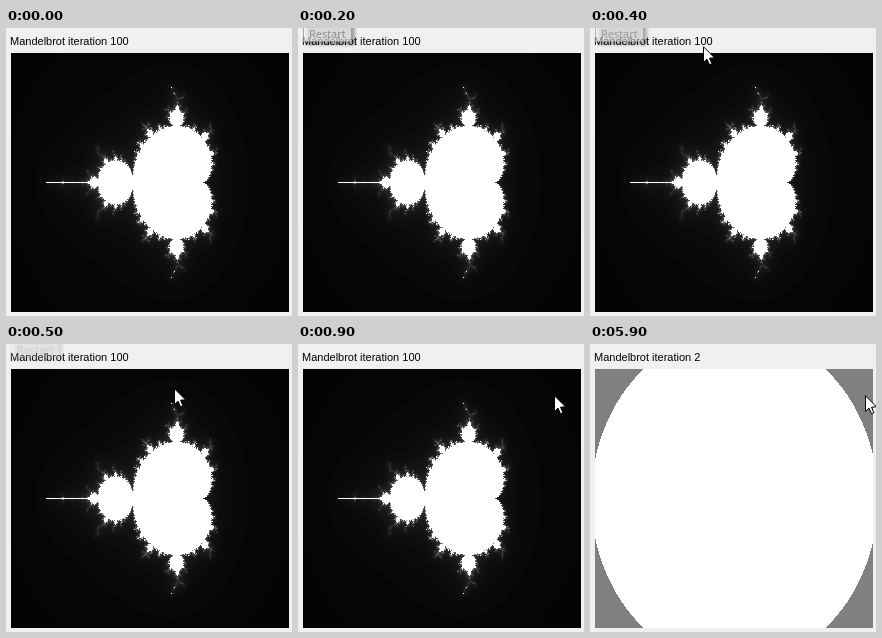
These frames come from a looping animation (286x288 px, 8 s). An HTML page with a canvas:

```html
<!DOCTYPE html>
<html lang="en">
<head>
<meta charset="utf-8">
<title>Mandelbrot iteration</title>
<style>
html, body { margin: 0; width: 100%; height: 100%; overflow: hidden; background: #f0f0f0; }
canvas { display: block; }
</style>
</head>
<body>
<canvas id="stage" width="286" height="288"></canvas>
<script>
const ctx = document.getElementById('stage').getContext('2d');
const LOOP = 8000, STEP = 100, RESTART = 5900;
const PLOT = { x: 5, y: 25, w: 278, h: 259 };

// Pointer tip by time: [ms, x, y]
const PATH = [
  [300, 62, -2], [400, 113, 18], [500, 168, 44], [600, 212, 53],
  [700, 249, 55], [800, 253, 53], [900, 256, 51], [1000, 266, 51], [1100, 275, 51]
];
const TIP_ALPHA = [0, 0.2, 0.6, 0.93, 0.5, 0.14, 0];

// Number of iterates that stay within radius 4
function countSteps(cx, cy, max) {
  let x = 0, y = 0;
  for (let n = 0; n < max; n++) {
    const t = x * x - y * y + cx;
    y = 2 * x * y + cy;
    x = t;
    if (x * x + y * y > 16) return n;
  }
  return max;
}

function renderSet(max) {
  const { w, h } = PLOT;
  const layer = document.createElement('canvas');
  layer.width = w;
  layer.height = h;
  const c = layer.getContext('2d');
  const img = c.createImageData(w, h);
  for (let j = 0, p = 0; j < h; j++) {
    for (let i = 0; i < w; i++, p += 4) {
      const n = countSteps(-2.5 + 4 * i / w, -1.5 + 3 * (j + 0.5) / h, max);
      img.data[p] = img.data[p + 1] = img.data[p + 2] = Math.round(255 * n / max);
      img.data[p + 3] = 255;
    }
  }
  c.putImageData(img, 0, 0);
  return layer;
}

const sets = { 2: renderSet(2), 100: renderSet(100) };

function drawTooltip(alpha) {
  if (!alpha) return;
  ctx.save();
  ctx.globalAlpha = alpha;
  ctx.shadowColor = 'rgba(0,0,0,0.55)';
  ctx.shadowBlur = 3;
  ctx.shadowOffsetX = ctx.shadowOffsetY = 3;
  ctx.fillStyle = '#fff';
  ctx.fillRect(5, -6, 49, 20);
  ctx.shadowColor = 'transparent';
  ctx.strokeStyle = '#767676';
  ctx.lineWidth = 1;
  ctx.strokeRect(5.5, -5.5, 48, 19);
  ctx.fillStyle = '#575757';
  ctx.font = '11px "Open Sans", "Noto Sans", sans-serif';
  ctx.fillText('Restart', 11, 10);
  ctx.restore();
}

function drawPointer(x, y) {
  ctx.save();
  ctx.translate(x, y);
  ctx.beginPath();
  ctx.moveTo(0.5, 0.8);
  ctx.lineTo(0.5, 16.4);
  ctx.lineTo(4, 13.1);
  ctx.lineTo(6.5, 18.7);
  ctx.lineTo(8.9, 17.7);
  ctx.lineTo(6.5, 12.2);
  ctx.lineTo(11.5, 11.8);
  ctx.closePath();
  ctx.fillStyle = '#fff';
  ctx.fill();
  ctx.strokeStyle = '#000';
  ctx.lineWidth = 1;
  ctx.stroke();
  ctx.restore();
}

function draw(ms) {
  const t = Math.floor(ms / STEP) * STEP;
  const max = t < RESTART ? 100 : 2;
  ctx.fillStyle = '#f0f0f0';
  ctx.fillRect(0, 0, 286, 288);
  ctx.drawImage(sets[max], PLOT.x, PLOT.y);
  ctx.fillStyle = '#000';
  ctx.font = '11px "Liberation Sans", Arial, sans-serif';
  ctx.fillText('Mandelbrot iteration ' + max, 4, 17);
  drawTooltip(TIP_ALPHA[t / STEP] || 0);
  const spot = PATH.filter(p => p[0] <= t).pop();
  if (spot) drawPointer(spot[1], spot[2]);
}

const start = performance.now();
function tick() {
  draw((performance.now() - start) % LOOP);
  requestAnimationFrame(tick);
}
tick();
</script>
</body>
</html>
```
